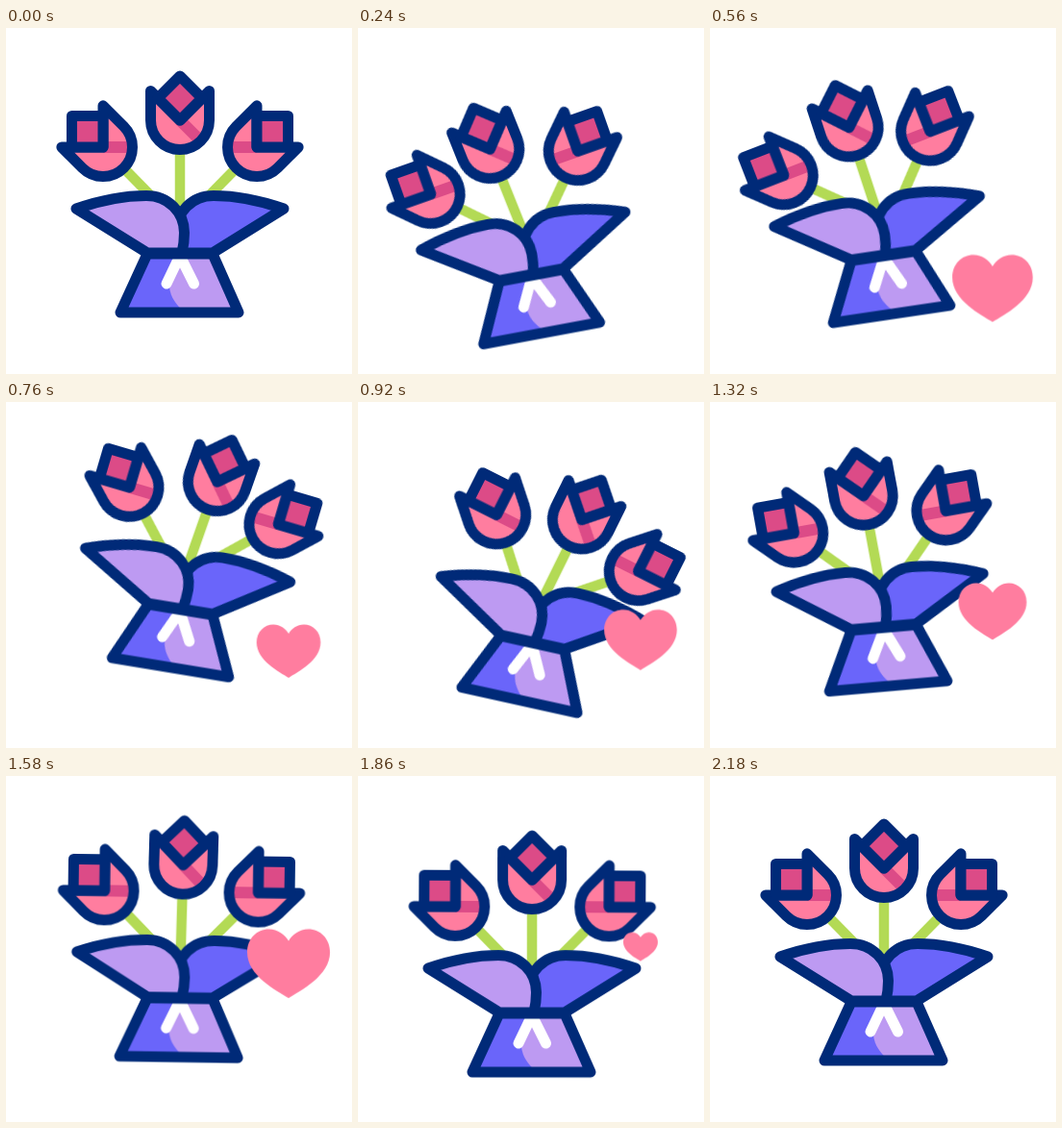
Write an HTML page that moves like this. It is 360x360 px and loops after 2.4 s.

```html
<!DOCTYPE html>
<html lang="en">
<head>
<meta charset="utf-8">
<title>Bouquet</title>
<style>
  html, body { margin: 0; width: 100%; height: 100%; overflow: hidden; background: #fff; }
  svg { display: block; width: 100%; height: 100%; }
  g { transform-box: view-box; }
  .ink { stroke: #002a78; stroke-width: 11; stroke-linejoin: round; stroke-linecap: round; }
  .stem { stroke: #b3da55; stroke-width: 10.5; }
  .pink { fill: #ff7d9f; }
  .rose { fill: #dc4b87; }
  .lilac { fill: #bd9af2; }
  .violet { fill: #6a65fa; }
  #sway { transform-origin: 181px 238px; }
  #left { transform-origin: 153px 177px; }
  #mid { transform-origin: 181px 190px; }
  #right { transform-origin: 209px 177px; }
</style>
</head>
<body>
<svg viewBox="0 0 360 360">
  <defs>
    <g id="tulip">
      <path class="pink" d="M-30.5-30.5V0A30.5 30.5 0 0 0 30.5 0V-30.5L0 0Z"/>
      <path d="M0 0L21.5 21.5" stroke="#dc4b87" stroke-width="12"/>
      <path class="ink" fill="none" d="M-30.5-30.5V0A30.5 30.5 0 0 0 30.5 0V-30.5L0 0Z"/>
      <path class="ink rose" d="M0 0L-23-23L0-46L23-23Z"/>
    </g>
    <g id="bloom">
      <path class="stem" d="M101 124L163 187"/>
      <use href="#tulip" transform="translate(101 124) rotate(-45)"/>
    </g>
  </defs>

  <g id="bob"><g id="sway">
    <g id="left"><use href="#bloom"/></g>
    <g id="right"><use href="#bloom" transform="translate(362 0) scale(-1 1)"/></g>
    <g id="mid">
      <path class="stem" d="M181 96V200"/>
      <use href="#tulip" transform="translate(181 96)"/>
    </g>

    <path class="ink violet" d="M289 188Q250 174.5 216 174.5C193 174.5 177 192 177 213L179 234H215Z"/>
    <path class="ink lilac" d="M73 188Q112 174.5 146 174.5C169 174.5 185.5 192 185.5 213Q185.5 224 183 234H147Z"/>

    <path class="violet" d="M147 235H215L242 296H119Z"/>
    <path class="lilac" d="M180 235H215L242 296H187C167 282 164 260 180 235Z"/>
    <path d="M178 243L167 266M184 243L195.5 266" stroke="#fff" stroke-width="11" stroke-linecap="round"/>
    <path class="ink" fill="none" d="M147 235H215L242 296H119Z"/>
  </g></g>

  <g id="rise"><g id="pulse">
    <path class="pink" d="M0 26.5C-12 19-42 4-42-20C-42-34-32-43.5-20-43.5C-11-43.5-4-38 0-31.5C4-38 11-43.5 20-43.5C32-43.5 42-34 42-20C42 4 12 19 0 26.5Z"/>
  </g></g>
</svg>

<script>
  const LOOP = 2400;
  const SINE = 'cubic-bezier(.37,0,.63,1)';

  // Steps are [time in ms, value]; the last value holds to the end of the loop.
  function play(id, steps, shape, { easing = SINE, delay = 0 } = {}) {
    const frames = [...steps, [LOOP, steps.at(-1)[1]]].map(([t, v]) => ({
      offset: t / LOOP, transform: shape(v), easing
    }));
    document.getElementById(id).animate(frames, { duration: LOOP, iterations: Infinity, delay });
  }

  const swing = [[0, 0], [400, -16], [870, 13], [1320, -5], [1650, 1.5], [1880, 0]];
  const bounce = [[0, 0], [400, 34], [700, -23], [1040, 30], [1460, -10], [1800, 13], [2160, 0]];
  const beat = [[0, 0], [300, 0], [540, 84], [790, 66], [1110, 93], [1380, 68], [1700, 94], [1980, 0]];
  const climb = [[0, 317], [1080, 244.5], [LOOP, 137.5]];

  const turn = v => `rotate(${v}deg)`;
  const sway = v => turn(v * 1.1);

  play('bob', bounce, v => `translateY(${v}px)`);
  play('sway', swing, turn);

  // The flowers follow the bouquet's swing, the outer two a little late.
  play('mid', swing, sway, { delay: 5 });
  play('left', swing, sway, { delay: 40 });
  play('right', swing, sway, { delay: 40 });

  play('rise', climb, v => `translate(294px, ${v}px)`, { easing: 'linear' });
  play('pulse', beat, v => `scale(${v / 84})`);
</script>
</body>
</html>
```
